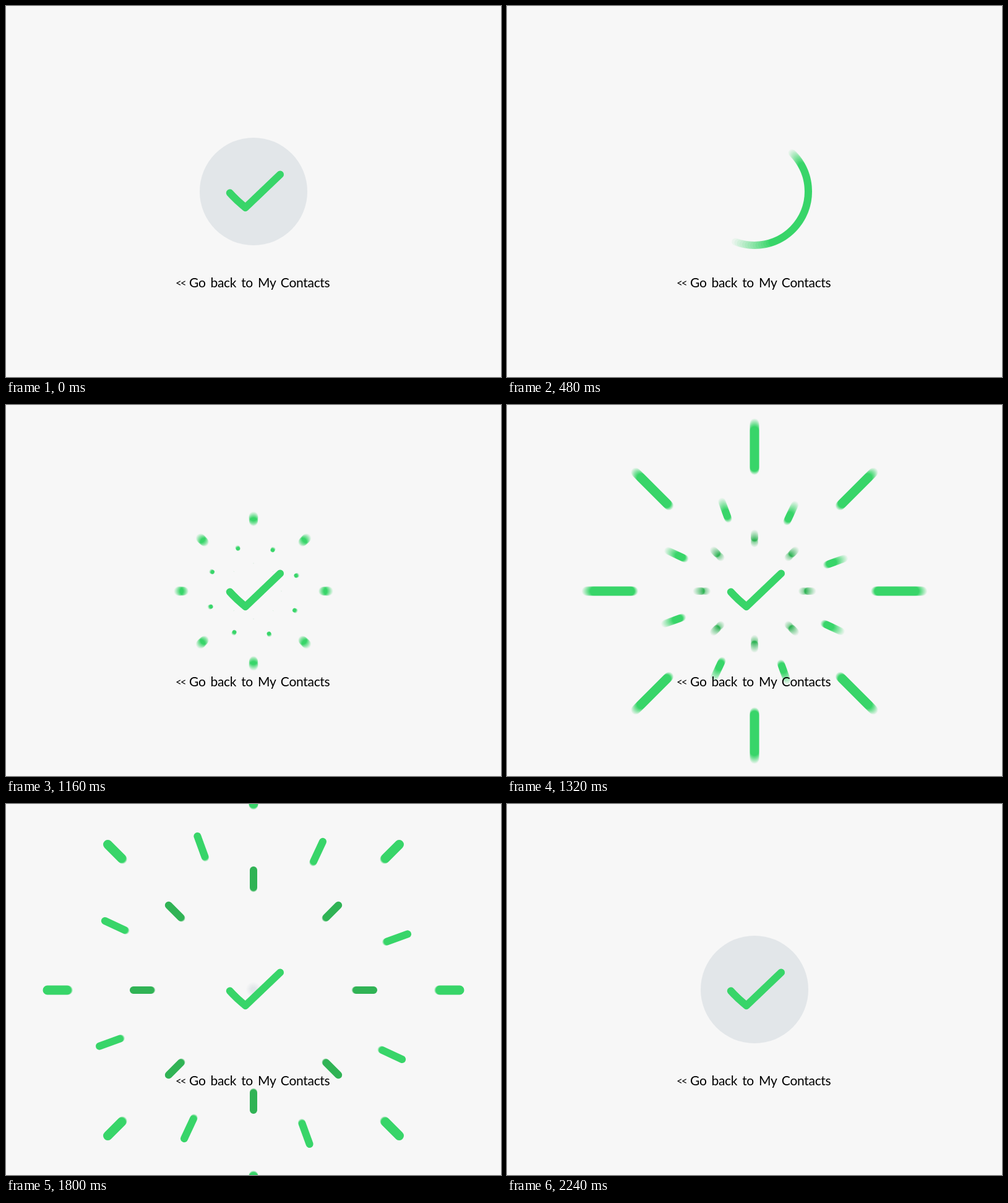
These frames come from a looping animation (800x600 px, 2.48 s). An HTML page with a canvas:

```html
<!DOCTYPE html>
<html lang="en">
<head>
<meta charset="utf-8">
<title>Saved</title>
<style>
  html, body { margin: 0; width: 100%; height: 100%; overflow: hidden; background: #f7f7f7; }
  canvas, svg { position: absolute; left: 0; top: 0; width: 800px; height: 600px; }
  text { font: 21px Lato, "Open Sans", sans-serif; letter-spacing: -0.3px; word-spacing: 2.9px; }
  .arrows { font-size: 17px; letter-spacing: -2px; }
</style>
</head>
<body>
<canvas id="stage" width="800" height="600"></canvas>
<svg viewBox="0 0 800 600">
  <text class="arrows" x="274" y="454">&lt;&lt;</text>
  <text x="296" y="455">Go back to My Contacts</text>
</svg>
<script>
const W = 800, H = 600, LOOP = 2480, STEP = 40;
const START = 200, RAYS_END = 2215;
const SAMPLES = 15, SHUTTER = 20;
const BG = '#f7f7f7', LIME = '#38d569', DARK = '#30b355', GREY = '#e2e6e9';

const ctx = document.getElementById('stage').getContext('2d');
const mask = document.createElement('canvas');
mask.width = W;
mask.height = H;
const m = mask.getContext('2d');

const easeOut = x => 1 - (1 - x) ** 2;

// Bezier easing with level handles: slow start, quick middle, long landing.
function swing(x) {
  let lo = 0, hi = 1;
  for (let i = 0; i < 20; i++) {
    const s = (lo + hi) / 2, r = 1 - s;
    if (1.5 * r * r * s + 0.36 * r * s * s + s ** 3 < x) lo = s;
    else hi = s;
  }
  return lo * lo * (3 - 2 * lo);
}

function move(t, start, end, from, to, ease) {
  const x = Math.min(1, Math.max(0, (t - start) / (end - start)));
  return from + (to - from) * ease(x);
}

function pathLength(d) {
  const p = document.createElementNS('http://www.w3.org/2000/svg', 'path');
  p.setAttribute('d', d);
  return p.getTotalLength();
}

// One turn of the ring, a bend inwards, then the tick.
const half = 'A87 87 0 0 0 ';
const lead = `M400 213 ${half}400 387 ${half}400 213 ${half}352 227.4 C330 242 332 272 361 301.5`;
const track = lead + ' Q372 314 387 326 L443 272.5';
const trackPath = new Path2D(track);
const tickStart = pathLength(lead), tickEnd = pathLength(track);

// Each ray leaves radius r0 for r1; its inner end follows later.
const long = { turn: 0, width: 15, r0: 95, r1: 333, start: 1030, end: 1680, tailStart: 1010, tailEnd: 2260 };
const mid = { turn: 25, width: 12, r0: 70, r1: 265, start: 1084, end: 1814, tailStart: 1135, tailEnd: 2300 };
const short = { turn: 0, width: 12, r0: 45, r1: 194, start: 1160, end: 1715, tailStart: 1155, tailEnd: 2300 };

function drawDisc(t) {
  m.beginPath();
  m.arc(400, 300, move(t, 1780, 2200, 0, 87, easeOut), 0, 2 * Math.PI);
  m.fill();
}

function drawTrack(t) {
  const head = move(t, START, 988, 0, tickEnd, easeOut);
  const tail = move(t, 219, 1016, 0, tickStart, swing);
  if (head - tail < 0.1) return;
  m.lineWidth = 12;
  m.setLineDash([head - tail, 5000]);
  m.lineDashOffset = -tail;
  m.stroke(trackPath);
  m.setLineDash([]);
}

function drawRays(ray, t) {
  if (t <= ray.start || t > RAYS_END) return;
  const outer = move(t, ray.start, ray.end, ray.r0, ray.r1, swing);
  const inner = Math.min(outer - 0.1, move(t, ray.tailStart, ray.tailEnd, ray.r0, ray.r1, easeOut));
  m.lineWidth = ray.width * Math.min(1, (t - ray.start) / 130);
  m.beginPath();
  for (let i = 0; i < 8; i++) {
    const a = (ray.turn + i * 45) * Math.PI / 180;
    const c = Math.cos(a), s = Math.sin(a);
    m.moveTo(400 + inner * c, 301 + inner * s);
    m.lineTo(400 + outer * c, 301 + outer * s);
  }
  m.stroke();
}

// Adds up several moments within the shutter time, then tints the sum.
function blurred(color, t, draw) {
  m.globalCompositeOperation = 'source-over';
  m.clearRect(0, 0, W, H);
  m.globalCompositeOperation = 'lighter';
  m.globalAlpha = 1 / SAMPLES;
  m.fillStyle = m.strokeStyle = '#fff';
  m.lineCap = m.lineJoin = 'round';
  for (let i = 0; i < SAMPLES; i++) {
    draw(t + (i / (SAMPLES - 1) - 0.5) * SHUTTER);
  }
  m.globalAlpha = 1;
  m.globalCompositeOperation = 'source-in';
  m.fillStyle = color;
  m.fillRect(0, 0, W, H);
  ctx.drawImage(mask, 0, 0);
}

function render(time) {
  const t = time < START ? LOOP - STEP : time;
  ctx.fillStyle = BG;
  ctx.fillRect(0, 0, W, H);
  blurred(GREY, t, drawDisc);
  blurred(DARK, t, s => drawRays(short, s));
  blurred(LIME, t, s => {
    drawRays(long, s);
    drawRays(mid, s);
  });
  blurred(LIME, t, drawTrack);
}

const begin = performance.now();
let shown = -1;
function tick() {
  const time = Math.floor((performance.now() - begin) % LOOP / STEP) * STEP;
  if (time !== shown) {
    shown = time;
    render(time);
  }
  requestAnimationFrame(tick);
}
tick();
</script>
</body>
</html>
```
